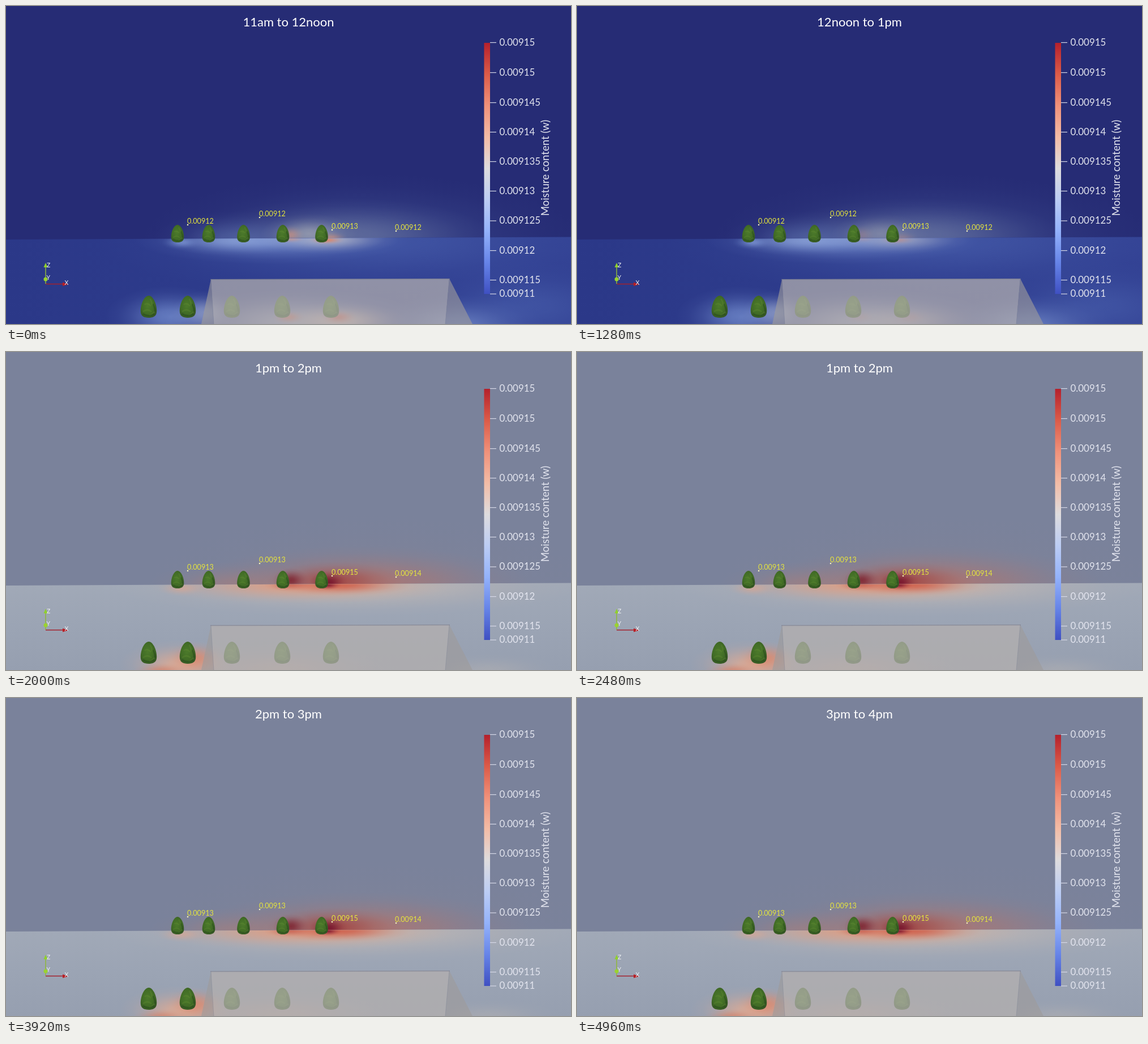
An HTML page for the animation above (5040 ms loop, 998 by 561 pixels).

```html
<!DOCTYPE html>
<html lang="en">
<head>
<meta charset="utf-8">
<title>Moisture content</title>
<style>
html, body { margin: 0; width: 100%; height: 100%; overflow: hidden; background: #262c75; }
svg { display: block; width: 100vw; height: 100vh; font-family: Lato, "Open Sans", sans-serif; }
</style>
</head>
<body>
<svg id="stage" viewBox="0 0 998 561" preserveAspectRatio="none"></svg>
<script>
const LOOP = 5040, STEP = 80;
const SKY = 'M0 0H998V407.5L560 409.5L0 412Z';
const GROUND = 'M0 412L560 409.5L998 407.5V561H0Z';
const stage = document.getElementById('stage');

const defs = [];
let uid = 0;

// Soft elliptical patch of colour
function glow(cx, cy, rx, ry, rgb, alpha) {
  const id = 'g' + uid++;
  const stops = [[0, 1], [.2, .87], [.4, .58], [.6, .29], [.8, .09], [1, 0]];
  defs.push(`<radialGradient id="${id}">` + stops.map(([o, a]) =>
    `<stop offset="${o}" stop-color="rgb(${rgb})" stop-opacity="${(a * alpha).toFixed(3)}"/>`).join('') +
    '</radialGradient>');
  return `<ellipse cx="${cx}" cy="${cy}" rx="${rx}" ry="${ry}" fill="url(#${id})"/>`;
}

const glows = list => list.map(g => glow(...g)).join('');

function scene(id, skyFill, groundFill, sky, ground) {
  return `<g id="${id}">
    <path d="M0 0H998V561H0Z" fill="${skyFill}"/>
    <g clip-path="url(#skyClip)">${glows(sky)}</g>
    <path d="${GROUND}" fill="${groundFill}"/>
    <g clip-path="url(#groundClip)">${glows(ground)}</g>
  </g>`;
}

// Cool scenes share a layout; heat scales the warm spots
function coolScene(id, heat) {
  const warm = '236,150,112', pale = '190,192,190';
  return scene(id, '#262c75', 'url(#coolGround)', [
    [630, 410, 390, 115, '86,108,170', .45],
    [600, 405, 260, 66, '135,146,172', .45],
    [410, 410, 150, 48, '105,128,185', .48],
    [535, 402, 85, 36, pale, .34 + .2 * heat],
    [502, 404, 26, 18, warm, .15 + .35 * heat],
    [574, 410, 30, 13, warm, .2 + .35 * heat]
  ], [
    [640, 415, 480, 95, '84,110,185', .45],
    [470, 412, 245, 44, '140,165,222', .68],
    [400, 414, 135, 26, '160,184,230', .5],
    [310, 417, 35, 13, '150,178,235', .5],
    [570, 412, 125, 26, '205,203,205', .45 + .2 * heat],
    [503, 411, 26, 8, warm, .15 + .3 * heat],
    [567, 413, 32, 8, '232,125,85', .25 + .5 * heat],
    [290, 548, 115, 54, '125,152,215', .68],
    [350, 540, 58, 38, '170,184,215', .5],
    [510, 558, 230, 60, '205,205,215', .62],
    [590, 556, 120, 34, '235,195,175', .2 + .5 * heat],
    [499, 549, 30, 13, '225,95,65', .1 + .6 * heat],
    [588, 549, 32, 14, '215,75,60', .1 + .65 * heat],
    [800, 562, 150, 52, '130,155,212', .6],
    [920, 530, 210, 80, '84,110,185', .4]
  ]);
}

function warmScene() {
  return scene('warm', '#7a829b', 'url(#warmGround)', [
    [640, 410, 400, 125, '140,132,145', .35],
    [625, 408, 300, 66, '190,112,98', .66],
    [400, 412, 150, 42, '185,125,112', .4],
    [580, 404, 120, 34, '160,52,48', .62],
    [503, 403, 32, 22, '120,18,32', .7],
    [570, 406, 34, 20, '112,12,40', .8]
  ], [
    [600, 412, 420, 54, '214,192,176', .6],
    [520, 412, 270, 32, '226,152,122', .8],
    [310, 417, 42, 14, '224,166,142', .55],
    [590, 411, 125, 19, '206,82,62', .75],
    [500, 411, 45, 11, '190,58,50', .45],
    [568, 411, 25, 9, '120,15,45', .8],
    [310, 552, 110, 44, '226,172,148', .85],
    [335, 541, 52, 30, '222,128,98', .68],
    [275, 562, 50, 14, '220,120,90', .55],
    [480, 560, 220, 45, '226,175,150', .4],
    [850, 562, 130, 30, '200,190,180', .3]
  ]);
}

function tree(x, y, s) {
  return `<g transform="translate(${x} ${y}) scale(${s})">
    <path d="M-11.300 6C-11.300-4-6-15.500 0-15.500C6-15.500 11.300-4 11.300 6C11.300 13 7 15.500 0 15.500C-7 15.500-11.300 13-11.300 6Z" fill="url(#leaf)"/>
    <path d="M-6-3Q-1-6 3-1M-8 7Q-2 2 4 7M2-11Q5-6 5-2M1 12Q5 11 8 7" fill="none" stroke="#78a03c" stroke-opacity=".2" stroke-width="2"/>
    <path d="M-8 10Q0 15 8 10M6-4Q9 2 9 7" fill="none" stroke="#1e3f18" stroke-opacity=".35" stroke-width="2"/>
  </g>`;
}

const backRow = [303, 358, 419.5, 489, 557.5].map(x => tree(x, 401.5, 1)).join('');
const frontRow = [252, 321, 399, 488, 574].map(x => tree(x, 530.5, 1.26)).join('');

const building = `
  <path d="M362 482L345 561H367Z M783 481L776 561H824Z" fill="rgb(158,155,155)" fill-opacity=".62"/>
  <path d="M362 482L783 481L776 561H367Z" fill="rgb(181,176,175)" fill-opacity=".72"/>
  <path d="M361 482.500L784 481.500" stroke="#777b8c" stroke-width="1.500" stroke-opacity=".6"/>
  <path d="M362 482L367 561M783 481L776 561" stroke="#777b8c" stroke-opacity=".35" fill="none"/>`;

const ticks = [[64, '0.00915'], [117, '0.00915'], [170, '0.009145'], [222, '0.00914'],
  [274, '0.009135'], [326, '0.00913'], [378.5, '0.009125'], [431, '0.00912'],
  [483, '0.009115'], [507.5, '0.00911']];

const scaleBar = `
  <rect x="844.500" y="65" width="10.500" height="443" fill="url(#bar)"/>
  <g fill="#e2e4ee" font-size="16.900">` + ticks.map(([y, s]) =>
    `<path d="M855 ${y + .5}H866" stroke="#d5d8e6" stroke-width="1.200"/><text x="871.500" y="${y + 5.5}">${s}</text>`).join('') +
  `<text transform="translate(958.500 285.500) rotate(-90)" text-anchor="middle" font-size="18.600">Moisture content (w)</text></g>`;

const axes = `
  <path d="M70 490.500H104" stroke="#a3202c" stroke-width="1.500"/>
  <path d="M100 487.500L110 491L100 494Z" fill="#b81e24"/>
  <path d="M70 490V458" stroke="#8fb83a" stroke-width="1.500"/>
  <path d="M66.500 461L70 453L73.500 461Z" fill="#8fd02c"/>
  <circle cx="70" cy="482" r="3.500" fill="#9ad32f"/>
  <g fill="#eef0f4" font-size="10.500"><text x="72" y="460.500">Z</text><text x="71.500" y="482.500">Y</text><text x="103.500" y="492">X</text></g>`;

const probes = [[320, 384, 321, 386], [447, 371, 448, 373], [575, 393, 576, 395], [687, 395, 689, 397]];
const readings = '<g fill="#e6e53c" font-size="12.600">' + probes.map(([x, y, dx, dy]) =>
  `<circle cx="${dx}" cy="${dy}" r="1.300" fill="#f6f4bd"/><text class="probe" x="${x}" y="${y}"></text>`).join('') + '</g>';

const scenes = coolScene('cool', 1) + coolScene('mild', .15) + warmScene();

const ramp = (id, attrs, colors) => `<linearGradient id="${id}" ${attrs}>` + colors.map((c, i) =>
  `<stop offset="${i / (colors.length - 1)}" stop-color="${c}"/>`).join('') + '</linearGradient>';

stage.innerHTML = `<defs>
  <clipPath id="skyClip"><path d="${SKY}"/></clipPath>
  <clipPath id="groundClip"><path d="${GROUND}"/></clipPath>
  <radialGradient id="leaf" cx=".45" cy=".45" r=".62">
    <stop offset="0" stop-color="#4c7a2b"/><stop offset=".6" stop-color="#416c25"/><stop offset="1" stop-color="#345424"/>
  </radialGradient>
  ${ramp('coolGround', 'x2="1" y2="0"', ['#2b3888', '#2d3b8b', '#303f91', '#324193'])}
  ${ramp('warmGround', 'x2="0" y2="1"', ['#a1a9b7', '#9ba4b4', '#969fb0'])}
  ${ramp('bar', 'x2="0" y2="1"', ['#b5202c', '#dc5b48', '#f0917a', '#f3bca6', '#dedcde', '#bccdf4', '#93b2fb', '#6684e8', '#3f50c2'])}
  ${defs.join('')}
  </defs>${scenes}${backRow}${frontRow}${building}${readings}${scaleBar}${axes}
  <text id="title" x="499" y="36" text-anchor="middle" font-size="22" fill="#fff"></text>`;

const hours = [
  ['11am to 12noon', 'cool'], ['12noon to 1pm', 'mild'],
  ['1pm to 2pm', 'warm'], ['2pm to 3pm', 'warm'], ['3pm to 4pm', 'warm']
];
const values = {
  cool: ['0.00912', '0.00912', '0.00913', '0.00912'],
  mild: ['0.00912', '0.00912', '0.00913', '0.00912'],
  warm: ['0.00913', '0.00913', '0.00915', '0.00914']
};
const title = document.getElementById('title');
const probeTexts = document.querySelectorAll('.probe');
let shown = -1;

function draw(time) {
  const t = Math.floor((time % LOOP) / STEP) * STEP;
  const hour = Math.min(4, Math.floor(t / 1000));
  if (hour !== shown) {
    shown = hour;
    const [label, look] = hours[hour];
    title.textContent = label;
    for (const id in values)
      document.getElementById(id).style.display = id === look ? '' : 'none';
    probeTexts.forEach((el, i) => { el.textContent = values[look][i]; });
  }
}

const start = performance.now();
function tick() {
  draw(performance.now() - start);
  requestAnimationFrame(tick);
}
tick();
</script>
</body>
</html>
```
